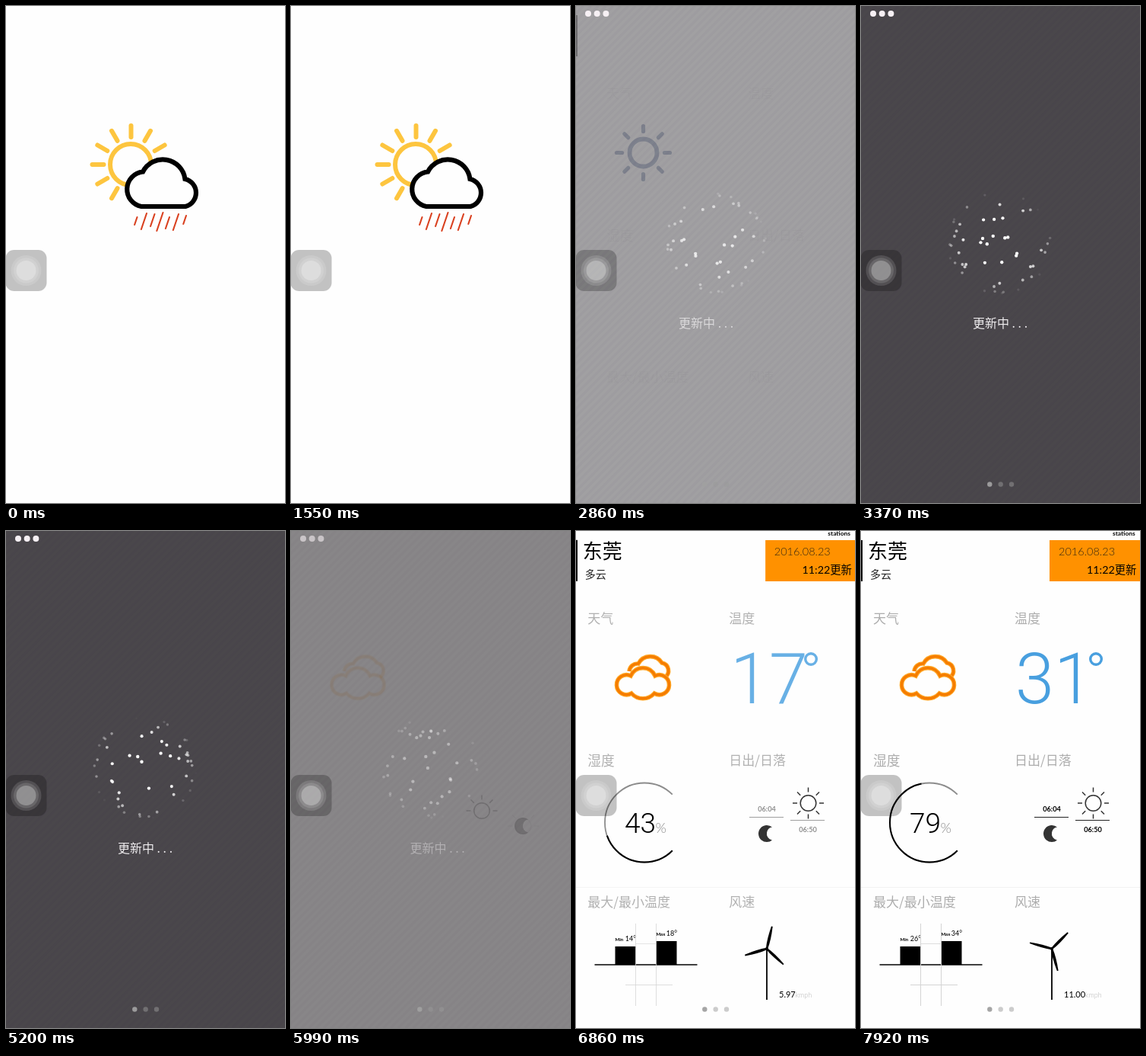
An HTML page with a canvas for the animation above (8000 ms loop, 367 px wide and 652 px high).

```html
<!DOCTYPE html>
<html lang="zh-CN">
<head>
<meta charset="utf-8">
<style>
  html, body { margin: 0; width: 367px; height: 652px; overflow: hidden; background: #fefefe; }
  canvas { display: block; }
</style>
</head>
<body>
<canvas id="stage" width="367" height="652"></canvas>
<script>
const LOOP = 8000, W = 367, H = 652, TAU = Math.PI * 2;
const ctx = document.getElementById('stage').getContext('2d');
const CJK = '"Noto Sans CJK SC", "Noto Sans CJK", sans-serif';
const LATO = 'Lato, "Noto Sans CJK SC", sans-serif';
const ROBOTO = 'Roboto, sans-serif';
const rad = deg => deg * Math.PI / 180;

// Piecewise linear value: time, value, time, value, ...
function track(t, ...keys) {
  if (t <= keys[0]) return keys[1];
  for (let i = 2; i < keys.length; i += 2) {
    if (t < keys[i]) {
      const k = (t - keys[i - 2]) / (keys[i] - keys[i - 2]);
      return keys[i - 1] + (keys[i + 1] - keys[i - 1]) * k;
    }
  }
  return keys[keys.length - 1];
}

function layer(alpha, draw, x = 0, y = 0) {
  if (alpha <= 0) return;
  ctx.save();
  ctx.globalAlpha *= alpha;
  ctx.translate(x, y);
  draw();
  ctx.restore();
}

function text(str, x, y, size, color, weight = 300, family = CJK, align = 'left') {
  ctx.font = `${weight} ${size}px ${family}`;
  ctx.fillStyle = color;
  ctx.textAlign = align;
  ctx.fillText(str, x, y);
  return ctx.measureText(str).width;
}

function line(x1, y1, x2, y2, color, width = 1) {
  ctx.strokeStyle = color;
  ctx.lineWidth = width;
  ctx.beginPath();
  ctx.moveTo(x1, y1);
  ctx.lineTo(x2, y2);
  ctx.stroke();
}

function dot(x, y, r, color) {
  ctx.fillStyle = color;
  ctx.beginPath();
  ctx.arc(x, y, r, 0, TAU);
  ctx.fill();
}

function ring(x, y, r, color, width, from = 0, to = 360) {
  ctx.strokeStyle = color;
  ctx.lineWidth = width;
  ctx.beginPath();
  ctx.arc(x, y, r, rad(from), rad(to));
  ctx.stroke();
}

function rays(x, y, r1, r2, from, to, step, color, width) {
  for (let a = from; a <= to; a += step) {
    const c = Math.cos(rad(a)), s = Math.sin(rad(a));
    line(x + c * r1, y + s * r1, x + c * r2, y + s * r2, color, width);
  }
}

// Splash icon
const splashCloud = new Path2D('M178 263A23 23 0 0 1 180 217.5A29.5 29.5 0 0 1 235.5 227A18.5 18.5 0 0 1 236 263Z');
const outsideCloud = new Path2D(`M0 0H${W}V${H}H0Z`);
outsideCloud.addPath(splashCloud);
const rain = [[172.5, 277, 10], [185, 272, 21], [195.5, 273, 16], [206.5, 271, 24],
  [215, 277, 15], [227, 273, 21], [237, 275, 11]];

function splash() {
  ctx.save();
  ctx.clip(outsideCloud, 'evenodd');
  ctx.lineCap = 'round';
  ring(164, 208, 27, '#fdc53f', 6);
  rays(164.5, 208, 36, 51, 120, 330, 30, '#fdc53f', 6);
  ctx.restore();
  ctx.strokeStyle = '#000';
  ctx.lineWidth = 6.2;
  ctx.stroke(splashCloud);
  ctx.lineCap = 'round';
  for (const [x, y, h] of rain) line(x, y, x - h * 0.34, y + h, '#d9401f', 2.1);
}

// Weather icons
function sunnyIcon() {
  ctx.lineCap = 'round';
  ring(88.5, 192.5, 18, '#526a94', 5.8);
  rays(88.5, 192.5, 28, 35, 0, 315, 45, '#526a94', 5.2);
}

const backCloud = new Path2D('M70 184A11 11 0 0 1 82 174A18 18 0 0 1 113 173A10.5 10.5 0 0 1 117 192');
const frontCloud = new Path2D('M72 190A17.5 17.5 0 0 1 104 190A13 13 0 1 1 103 213A20 20 0 0 1 73 213A13 13 0 1 1 72 190Z');

function cloudyIcon() {
  for (const cloud of [backCloud, frontCloud]) {
    for (const [width, color] of [[5.6, '#ffa726'], [3.4, '#f57c00']]) {
      ctx.lineWidth = width;
      ctx.strokeStyle = color;
      ctx.stroke(cloud);
    }
  }
}

function labels() {
  const color = '#adadad';
  text('天气', 16, 121, 17, color);
  text('温度', 202, 121, 17, color);
  text('湿度', 16, 308, 17.7, color);
  text('日出/日落', 202, 307, 17, color);
  text('最大/最小温度', 16, 493, 17, color);
  text('风速', 202, 493, 17, color);
}

function header(t, alpha) {
  const slide = track(t, 6050, 1.3, 6250, 1, 6900, 0);
  layer(alpha, () => {
    text('东莞', 9 - 3 * slide, 36, 26, '#000', 400);
    text('多云', 12 - 5 * slide, 62, 14, '#222');
    ctx.fillStyle = '#ff9100';
    ctx.fillRect(248 + 19 * slide, 12, W, 54);
    text('2016.08.23', 260 + 12 * slide, 32, 14.5, '#3a2a10', 300, LATO);
    text('11:22更新', 297 + 9 * slide, 56, 14.3, '#000', 400, LATO);
    text('stations', 331 + 6 * slide, 5.5, 8.4, '#000', 700, LATO);
  });
  const barAlpha = track(t, 2420, 0, 2560, 0.64, 2860, 0.4, 3300, 0, 6050, 0, 6250, 0.45, 6900, 1);
  layer(barAlpha, () => {
    ctx.fillStyle = '#000';
    ctx.fillRect(0, 12 - (t > 4000 ? 3 * slide : 0), 2, 54);
  });
}

function temperature(count) {
  const width = text(Math.round(31 * count), 254, 226, 92, '#489fdf', 300, ROBOTO, 'center');
  ring(254 + width / 2 + 4, 168, 7.3, '#489fdf', 3.4);
}

function humidity(t, count) {
  const sweep = track(t, 5950, 0, 6250, 146, 6600, 270);
  const start = track(t, 5950, 5, 6250, 25, 6600, 45);
  ring(90, 382.5, 52, '#8c8c8c', 1.8, start, start + sweep);
  ring(90, 382.5, 52, '#000', 2, start, start + Math.min(sweep, 270 * 0.79 * count));
  const width = text(Math.round(79 * count), 64, 396, 37, '#000', 300, ROBOTO);
  text('%', 63.5 + width, 396, 18.5, '#8a8a8a', 300, LATO);
}

function sunAt(x, y, lower) {
  ring(x, y, 10.3, '#333', 1.5);
  rays(x, y, 14.5, 20.5, 180, 360, 45, '#333', 1.5);
  layer(lower, () => rays(x, y, 14.5, 20.5, 45, 135, 45, '#333', 1.5));
}

function moonAt(x, y) {
  ctx.fillStyle = '#333';
  ctx.beginPath();
  ctx.arc(x, y, 11, rad(-50), rad(50), true);
  ctx.arc(x + 8.5, y, 8.6, rad(102), rad(258));
  ctx.fill();
}

function daylight(t) {
  const k = track(t, 6250, 0, 6750, 1);
  layer(1 - k, () => sunAt(251, 367 + 30 * k, 0));
  layer(k, () => moonAt(251, 367 + 30 * k));
  layer(1 - k, () => moonAt(305, 387 - 30 * k));
  layer(track(t, 5900, 0, 6250, 0.7, 6750, 1), () => sunAt(305.5, 387 - 30 * k, k));
  layer(track(t, 6600, 0, 7200, 1), () => {
    line(228, 375.5, 273, 375.5, '#222');
    line(282, 379.5, 327, 379.5, '#222');
    text('06:04', 251, 368, 9.2, '#000', 700, LATO, 'center');
    text('06:50', 305, 395, 9.2, '#000', 700, LATO, 'center');
  });
}

function range(t, count, alpha) {
  const grow = track(t, 6000, 0, 6250, 0.33, 6750, 1);
  const bar = (name, x, height, value) => {
    const top = 569 - height * grow;
    layer(alpha, () => {
      ctx.fillStyle = '#000';
      ctx.fillRect(x, top, 27, height * grow);
    });
    layer(track(t, 6000, 0, 6250, 0.85, 6500, 1), () => {
      text(name, x, top - 7, 6, '#000', 700, LATO);
      text(Math.round(value * count) + '°', x + 13.3, top - 7, 9, '#000', 400, LATO);
    });
  };
  bar('Min', 51.5, 24, 26);
  bar('Max', 105.5, 31, 34);
  layer(alpha, () => line(24.5, 569, 24.5 + 135 * grow, 569, '#000', 1.3));
  layer(track(t, 6400, 0, 7000, 1), () => {
    line(78.5, 515, 78.5, 623, '#d4d4d4');
    line(105.5, 515, 105.5, 623, '#d4d4d4');
    line(79, 541.5, 105, 541.5, '#ddd');
    line(65, 595.5, 127, 595.5, '#d4d4d4');
    line(0, 467.5, W, 467.5, '#f2f2f2');
  });
}

function wind(t, count, alpha) {
  const apart = track(t, 6000, 1.4, 6250, 1, 6850, 0);
  const turn = track(t, 6700, 0, 7000, 25, 7920, 165, 8000, 177);
  layer(alpha, () => {
    line(251, 548 + 53 * apart, 251, 615 + 53 * apart, '#000', 1.8);
    dot(251, 548, 2, '#000');
    for (let i = 0; i < 3; i++) {
      ctx.save();
      ctx.translate(251, 548);
      ctx.rotate(rad(turn + i * 120));
      ctx.translate(0, -28 * apart);
      ctx.fillStyle = '#000';
      ctx.beginPath();
      ctx.moveTo(-1.2, 0);
      ctx.quadraticCurveTo(-2.8, -12, -1, -30);
      ctx.lineTo(0.8, -30);
      ctx.quadraticCurveTo(2.8, -12, 1.2, 0);
      ctx.fill();
      ctx.restore();
    }
  });
  layer(track(t, 6000, 0, 6250, 0.8, 6600, 1), () => {
    const width = text((11 * count).toFixed(2), 267, 612, 11, '#000', 400, LATO);
    layer(alpha, () => text('kmph', 267 + width, 612, 9, '#b5b5b5', 300, LATO));
  });
}

// Loading overlay
let seed = 11;
const random = () => (seed = seed * 16807 % 2147483647) / 2147483647;
const particles = Array.from({ length: 110 }, () => ({ angle: random() * TAU, height: random() * 2 - 1 }));

function sphere(t) {
  const spin = t / 4000 * TAU, tilt = 0.25;
  for (const { angle, height } of particles) {
    const r = Math.sqrt(1 - height * height);
    const x = r * Math.sin(angle + spin), z0 = r * Math.cos(angle + spin);
    const y = height * Math.cos(tilt) - z0 * Math.sin(tilt);
    const z = height * Math.sin(tilt) + z0 * Math.cos(tilt);
    layer(Math.min(1, z * 1.2), () => dot(182 + 68 * x, 311 + 66 * y, 1.6 + 0.6 * z, '#fff'));
  }
}

function stripes() {
  for (let x = -H; x < W; x += 9.79) line(x, H, x + H, 0, 'rgba(60,20,70,.028)', 3.4);
}

function overlay(t) {
  layer(track(t, 2540, 0, 2600, 0.1, 2860, 0.51, 3190, 1, 5820, 1, 6310, 0), () => {
    ctx.fillStyle = '#4a474b';
    ctx.fillRect(0, 0, W, H);
  });
  layer(track(t, 2440, 0, 2600, 1, 5850, 1, 6300, 0), stripes);
  const shown = track(t, 2560, 0, 2900, 0.85, 3200, 1, 5800, 1, 6130, 0);
  layer(shown, () => sphere(t));
  const slide = track(t, 2600, -24, 2860, -12, 3150, 0, 5800, 0, 6200, 20);
  layer(shown, () => text('更新中 . . .', 147 + slide, 422, 16, '#eeecee'));
  layer(track(t, 2600, 0, 2800, 1, 5850, 1, 6200, 0), () => {
    for (const x of [16, 27.7, 39.4]) dot(x, 10, 4, '#f6f0f4');
  });
}

function touchButton() {
  ctx.fillStyle = 'rgba(0,0,0,.235)';
  ctx.beginPath();
  ctx.roundRect(-0.5, 320, 54, 54, 11);
  ctx.fill();
  dot(26.5, 347, 20, 'rgba(255,255,255,.13)');
  dot(26.5, 347, 16.5, 'rgba(255,255,255,.13)');
  dot(26.5, 347, 13, 'rgba(255,255,255,.27)');
}

function draw(t) {
  ctx.fillStyle = '#fefefe';
  ctx.fillRect(0, 0, W, H);

  const slide = track(t, 2420, 2, 2600, 11, 2860, 24, 3200, 40, 6050, -16, 6250, -12, 6900, 0);
  layer(track(t, 2420, 0, 2560, 0.52, 2600, 0.5, 2860, 0.1, 3100, 0, 6050, 0, 6250, 0.25, 6900, 1), labels, slide);
  layer(track(t, 2420, 0, 2560, 0.6, 2600, 0.6, 2860, 0.42, 3250, 0), sunnyIcon);

  const enter = track(t, 6000, 0, 6250, 0.36, 6750, 1);
  const count = track(t, 6030, 0, 7560, 1);
  header(t, enter);
  layer(track(t, 5900, 0, 6250, 0.42, 6750, 1), cloudyIcon);
  layer(track(t, 6200, 0, 6250, 0.04, 7000, 1), () => temperature(count));
  layer(enter, () => humidity(t, count));
  layer(track(t, 5850, 0, 6250, 0.95, 6400, 1), () => daylight(t));
  range(t, count, enter);
  wind(t, count, enter);

  overlay(t);
  layer(track(t, 2420, 1, 2600, 0.09, 2680, 0), splash);
  layer(track(t, 2420, 0, 2580, 1), () => {
    dot(169.3, 627.5, 3.2, 'rgba(160,160,160,.95)');
    dot(183.7, 627.5, 3.2, 'rgba(153,153,153,.5)');
    dot(198, 627.5, 3.2, 'rgba(153,153,153,.5)');
  });
  touchButton();
}

function frame() {
  draw(performance.now() % LOOP);
  requestAnimationFrame(frame);
}
frame();
</script>
</body>
</html>
```
